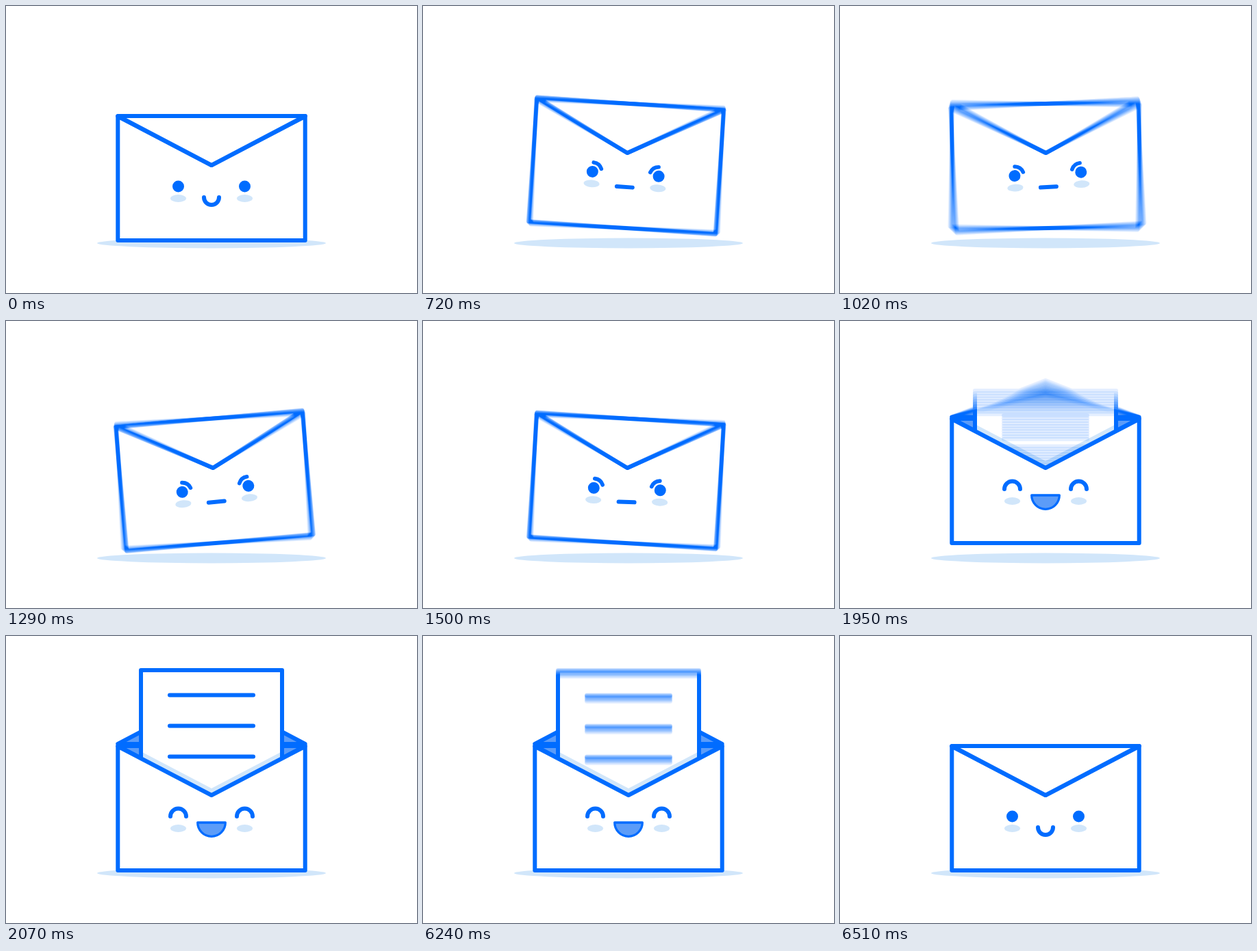
These frames come from a looping animation (600x420 px, 7.17 s). An HTML page with a canvas:

```html
<!DOCTYPE html>
<html>
<head>
<meta charset="utf-8">
<style>
html, body { margin: 0; width: 100%; height: 100%; overflow: hidden; background: #fff }
canvas { display: block; width: 100%; height: 100% }
</style>
</head>
<body>
<canvas id="stage" width="600" height="420"></canvas>
<script>
const LOOP = 7170, STEP = 30, SHUTTER = 20, SAMPLES = 10;
const BLUE = '#006cff', MID = '#5c9cf8', PALE = '#d1e6fa', WHITE = '#fff';
const L = 163.3, R = 436.7, TOP = 161, BOTTOM = 343, TIP = 233;

const view = document.getElementById('stage').getContext('2d');
const buffer = document.createElement('canvas');
buffer.width = 600;
buffer.height = 420;
const ink = buffer.getContext('2d');
let g = ink;

// Linear interpolation through [time, value] pairs
function key(t, ...points) {
  if (t <= points[0][0]) return points[0][1];
  for (let i = 1; i < points.length; i++) {
    const [t0, a] = points[i - 1], [t1, b] = points[i];
    if (t < t1) return a + (b - a) * (t - t0) / (t1 - t0);
  }
  return points[points.length - 1][1];
}

function pose(t) {
  const amp = key(t, [510, 0], [660, 4.1], [720, 4.1], [1290, 5.3], [1740, 2.18], [1900, 0]);
  const rise = key(t, [1880, 190], [1950, 70], [1980, 15], [2010, -6], [2040, -3], [2070, 0]);
  const sink = 190 * key(t, [6220, 0], [6370, 1]) ** 1.5;
  return {
    angle: amp * Math.cos(2 * Math.PI * (t - 720) / 126.67) * Math.PI / 180,
    lift: key(t, [520, 0], [580, 10], [640, 16], [690, 18], [1950, 18], [2040, 0]),
    letter: rise + sink,
    flap: key(t, [1830, 1], [1950, -0.74], [1980, -1], [6350, -1], [6500, 1])
  };
}

function place({ angle, lift }) {
  g.translate(300, 204 - lift);
  g.rotate(angle);
  g.translate(-300, -204);
}

function paint(fill, width) {
  if (fill) {
    g.fillStyle = fill;
    g.fill();
  }
  if (width) {
    g.strokeStyle = BLUE;
    g.lineWidth = width;
    g.lineCap = g.lineJoin = 'round';
    g.stroke();
  }
}

function poly(points, fill, width, open) {
  g.beginPath();
  points.forEach(([x, y]) => g.lineTo(x, y));
  if (!open) g.closePath();
  paint(fill, width);
}

function oval(x, y, rx, ry, fill) {
  g.beginPath();
  g.ellipse(x, y, rx, ry, 0, 0, 2 * Math.PI);
  paint(fill);
}

// Arc with angles in degrees
function arc(x, y, r, from, to, width, fill) {
  g.beginPath();
  g.arc(x, y, r, from * Math.PI / 180, to * Math.PI / 180);
  if (fill) g.closePath();
  paint(fill, width);
}

function flap(k) {
  const y = TOP - 3 * (1 - k) / 2;
  poly([[L, y], [R, y], [300, y + 72 * k]], k > 0 ? WHITE : MID, 6);
}

function letter(dy) {
  const y = 50 + dy;
  if (y > 240) return;
  const sheet = [[197, y], [403, y], [403, 300], [197, 300]];
  g.save();
  poly(sheet, WHITE);
  g.clip();
  poly([[197, 169], [300, 223], [403, 169], [403, 300], [197, 300]], PALE);
  g.restore();
  poly(sheet, null, 6);
  for (const row of [36.5, 81.5, 126.5]) {
    if (y + row < 290) poly([[239, y + row], [361, y + row]], null, 6, true);
  }
}

function envelope(p) {
  g.fillStyle = WHITE;
  g.fillRect(0, 0, 600, 420);
  oval(300, 347, 167, 7.4, PALE);
  g.save();
  place(p);
  if (p.flap <= 0) flap(p.flap);
  poly([[L, TOP], [R, TOP], [300, TIP]], MID, 6);
  letter(p.letter);
  poly([[L, TOP + 0.5], [300, TIP], [R, TOP + 0.5], [R, BOTTOM], [L, BOTTOM]], WHITE, 6);
  if (p.flap > 0) flap(p.flap);
  g.restore();
}

function face(mood) {
  for (const side of [-1, 1]) {
    const x = 300 + side * 48.5;
    oval(x, 281.5, 11.6, 5.4, PALE);
    if (mood === 'happy') {
      arc(x, 264, 11.5, 180, 360, 6);
    } else {
      oval(x, 264, 8.5, 8.5, BLUE);
    }
    if (mood === 'angry') {
      if (side < 0) arc(x, 264, 13.6, -86, -21, 5.6);
      else arc(x, 264, 13.6, -159, -94, 5.6);
    }
  }
  if (mood === 'happy') arc(300, 273, 20.3, 0, 180, 3.3, MID);
  else if (mood === 'angry') poly([[288.5, 283], [311.5, 283]], null, 6, true);
  else arc(300, 280, 11, 0, 180, 6);
}

function moodAt(t) {
  if (t < 540 || t >= 6420) return 'calm';
  return t < 1920 ? 'angry' : 'happy';
}

function draw(t) {
  const moving = (t >= 540 && t < 2070) || (t >= 6240 && t < 6510);
  const count = moving ? SAMPLES : 1;
  // Average several poses within the shutter time for motion blur
  for (let i = 0; i < count; i++) {
    g = ink;
    envelope(pose(t - SHUTTER * i / (SAMPLES - 1)));
    view.globalAlpha = 1 / (i + 1);
    view.drawImage(buffer, 0, 0);
  }
  view.globalAlpha = 1;
  g = view;
  g.save();
  place(pose(t));
  face(moodAt(t));
  g.restore();
}

const start = performance.now();
function tick() {
  const t = (performance.now() - start) % LOOP;
  draw(Math.floor(t / STEP) * STEP);
  requestAnimationFrame(tick);
}
tick();
</script>
</body>
</html>
```
